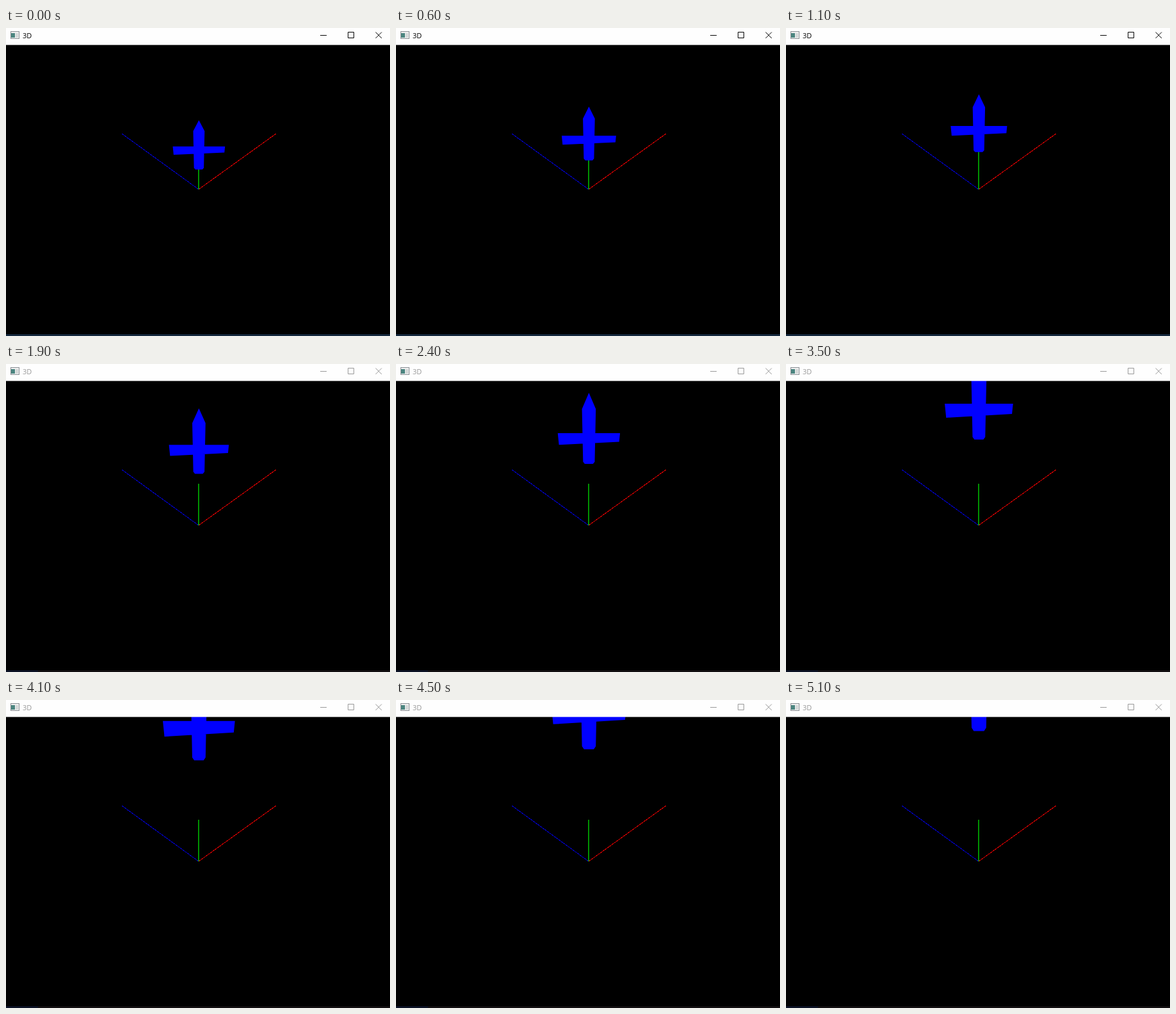
An HTML page for the animation above (5.2 s loop, 600 by 481 pixels).

```html
<!DOCTYPE html>
<html lang="en">
<head>
<meta charset="utf-8">
<title>3D</title>
<style>
  html, body { margin: 0; width: 100%; height: 100%; overflow: hidden; background: #000; }
  svg { display: block; }
  text { font: 11px "Open Sans", "Noto Sans", sans-serif; }
</style>
</head>
<body>
<svg width="600" height="481" viewBox="0 0 600 481">
  <rect width="600" height="481"/>
  <g fill="none">
    <path d="M301 252L181 165" stroke="#0000c8" shape-rendering="crispEdges"/>
    <path d="M301 252L422 165" stroke="#d80000" shape-rendering="crispEdges"/>
    <path d="M301 252V187" stroke="#00d000" stroke-width="1.4"/>
  </g>
  <path id="plane" fill="#00f"/>

  <rect width="600" height="26.5" fill="#fefefe"/>
  <g shape-rendering="crispEdges">
    <rect x="7" y="5" width="14" height="12" fill="#8a8f94"/>
    <rect x="8" y="6" width="12" height="10" fill="#f0f0f0"/>
    <rect x="8" y="8" width="6" height="7" fill="#4b8580"/>
    <rect x="15" y="8" width="4" height="7" fill="#d4d8d8"/>
  </g>
  <text id="label" x="26" y="16">3D</text>
  <g id="buttons" fill="none">
    <path d="M491 11.5H501M534.5 6.5H543.5V15.5H534.5Z"/>
    <path d="M577.5 6.5L587 16M587 6.5L577.5 16"/>
  </g>
  <rect id="edge" y="479" width="600" height="1"/>
  <rect id="edgeLeft" y="479" width="50" height="1"/>
</svg>
<script>
const LOOP = 5200, STEP = 100, BLUR_AT = 1500;
const CX = 301.4, CY = 252;           // foot of the vertical axis
const CLIMB = 1.92, NEARING = 0.003;  // rise per step, perspective per unit of height
const RADIUS = 7, SPAN = 35, WING_DEPTH = 0.03;
const NOSE = 81.6, SHOULDER = 71.5, TAIL = 28.4, WING = 57.5;
const $ = id => document.getElementById(id);

// Things grow as they rise towards the camera.
function project(x, height, depth = 0) {
  const scale = 1 / (1 + depth - NEARING * height);
  return `${CX + x * scale},${CY - height * scale}`;
}

function drawPlane(step) {
  const rise = CLIMB * step;
  const outline = points => 'M' + points.join('L') + 'Z';
  const hull = (x, h) => project(x, h + rise);
  const wing = (x, h) => project(x, h + rise, WING_DEPTH);
  $('plane').setAttribute('d',
    outline([
      hull(0, NOSE), hull(RADIUS, SHOULDER), hull(RADIUS, TAIL + 2),
      hull(RADIUS - 2, TAIL), hull(2 - RADIUS, TAIL),
      hull(-RADIUS, TAIL + 2), hull(-RADIUS, SHOULDER)
    ]) +
    outline([
      wing(-SPAN, WING), wing(SPAN, WING),
      wing(SPAN, WING - 7), wing(-SPAN, WING - 9.6)
    ]));
}

function drawWindow(active) {
  const ink = active ? '#000' : '#999';
  $('label').setAttribute('fill', ink);
  $('buttons').setAttribute('stroke', ink);
  $('edge').setAttribute('fill', active ? '#2f5f90' : '#2c2528');
  $('edgeLeft').setAttribute('fill', active ? '#2f5f90' : '#1c2c58');
}

const start = performance.now();
function frame() {
  const t = (performance.now() - start) % LOOP;
  drawPlane(Math.floor(t / STEP));
  drawWindow(t < BLUR_AT);
  requestAnimationFrame(frame);
}
frame();
</script>
</body>
</html>
```
